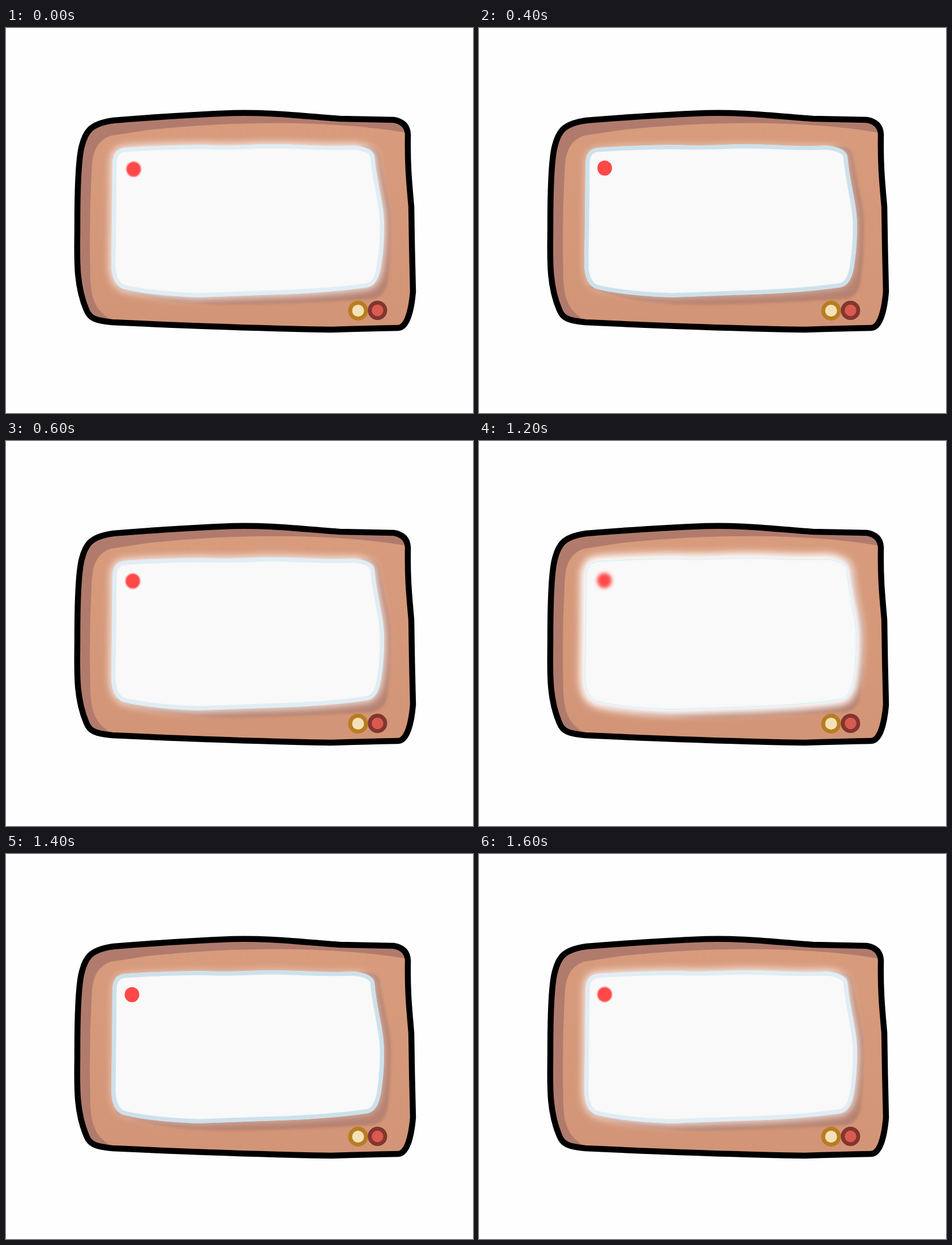
An HTML page that plays this animation: 825x679 px, repeating every 1.8 s.

```html
<!DOCTYPE html>
<html lang="en">
<head>
<meta charset="utf-8">
<title>Television</title>
<style>
  html, body { margin: 0; width: 100%; height: 100%; overflow: hidden; background: #fefefe; }
  svg { display: block; width: 825px; height: 679px; }
</style>
</head>
<body>
<svg viewBox="0 0 825 679">
  <defs>
    <path id="case" d="M148 179 Q160 167 190 163 Q300 154 400 150 C460 148 520 155 590 160 L685 162
      Q709 166 710 188 C709 240 712 270 716 315 Q717 390 719 465 C716 500 708 529 692 529
      Q640 530 575 532 Q400 529 188 519 C160 516 148 513 142 497 C122 450 126 400 126 350
      C126 290 128 230 134 208 Q139 188 148 179Z"/>
    <path id="face" d="M720 187 C610 166 440 160 250 180 L185 190 Q155 200 152 240
      Q146 340 149 440 C150 480 160 500 188 516 V560 H760 V187Z"/>
    <path id="recess" d="M628 208 Q655 206 660 224 C668 280 680 310 680 345 Q680 400 675 440
      Q672 476 645 478 Q520 486 400 488 Q260 488 192 455 L400 400Z"/>
    <path id="screen" d="M187 345 L188 240 Q188 212 212 211 Q265 207 345 206
      C400 209 430 205 470 205 C520 205 560 210 614 207 Q648 211 651 226
      C655 275 668 310 668 348 Q668 385 664 410 Q660 452 640 457 Q570 468 450 471
      L340 475 Q255 472 207 460 Q186 452 186 415Z"/>
    <clipPath id="caseClip"><use href="#case"/></clipPath>
    <clipPath id="screenClip"><use href="#screen"/></clipPath>
    <filter id="soft"><feGaussianBlur stdDeviation="2.2"/></filter>
    <filter id="halo" x="-20%" y="-20%" width="140%" height="140%"><feGaussianBlur stdDeviation="7"/></filter>
    <filter id="dotBlur" x="-100%" y="-100%" width="300%" height="300%"><feGaussianBlur id="blur"/></filter>
    <linearGradient id="wood" x2="0" y2="1">
      <stop stop-color="#d89b7c"/><stop offset="1" stop-color="#d29476"/>
    </linearGradient>
  </defs>

  <g clip-path="url(#caseClip)">
    <use href="#case" fill="#b07b6d"/>
    <use href="#face" fill="url(#wood)"/>
    <use href="#recess" fill="#b7826f" filter="url(#soft)"/>
    <use href="#screen" id="glow" fill="#fff" stroke="#fff" filter="url(#halo)"/>
  </g>
  <use href="#case" fill="none" stroke="#000" stroke-width="10.5" stroke-linejoin="round"/>

  <g clip-path="url(#screenClip)" fill="none">
    <use href="#screen" fill="#f9f9f9"/>
    <use href="#screen" id="rim" stroke-width="15"/>
    <use href="#screen" id="edge" stroke="#e4f0f6" stroke-width="5"/>
  </g>

  <circle cx="622" cy="498.5" r="14" fill="#f4e1b8" stroke="#b87d1f" stroke-width="7"/>
  <circle cx="656.3" cy="498" r="13.7" fill="#d95a4e" stroke="#83352f" stroke-width="6.8"/>
  <ellipse id="dot" rx="12.9" ry="13.3" fill="#ff4848" filter="url(#dotBlur)"/>
</svg>

<script>
const LOOP = 1800;
const levels = {
  dim: { rim: "#cde1eb", glow: 0.45, spread: 2, edge: 0, blur: 0.3 },
  lit: { rim: "#e0edf4", glow: 0.75, spread: 8, edge: 0, blur: 0.8 },
  flare: { rim: "#f6f9fa", glow: 1, spread: 17, edge: 1, blur: 3.3 }
};
const steps = [
  { at: 0, level: "lit", cx: 225.5, cy: 249 },
  { at: 400, level: "dim", cx: 222, cy: 247 },
  { at: 600, level: "lit", cx: 224, cy: 247 },
  { at: 1200, level: "flare", cx: 221.5, cy: 246 },
  { at: 1400, level: "dim", cx: 222.5, cy: 248 },
  { at: 1600, level: "lit", cx: 222, cy: 247.7 }
];

function set(id, attributes) {
  const element = document.getElementById(id);
  for (const name in attributes) element.setAttribute(name, attributes[name]);
}

function draw(time) {
  const { level, cx, cy } = steps.findLast(step => step.at <= time);
  const { rim, glow, spread, edge, blur } = levels[level];
  set("rim", { stroke: rim });
  set("edge", { opacity: edge });
  set("glow", { opacity: glow, "stroke-width": spread });
  set("blur", { stdDeviation: blur });
  set("dot", { cx, cy });
}

const start = performance.now();
function tick() {
  draw((performance.now() - start) % LOOP);
  requestAnimationFrame(tick);
}
tick();
</script>
</body>
</html>
```
